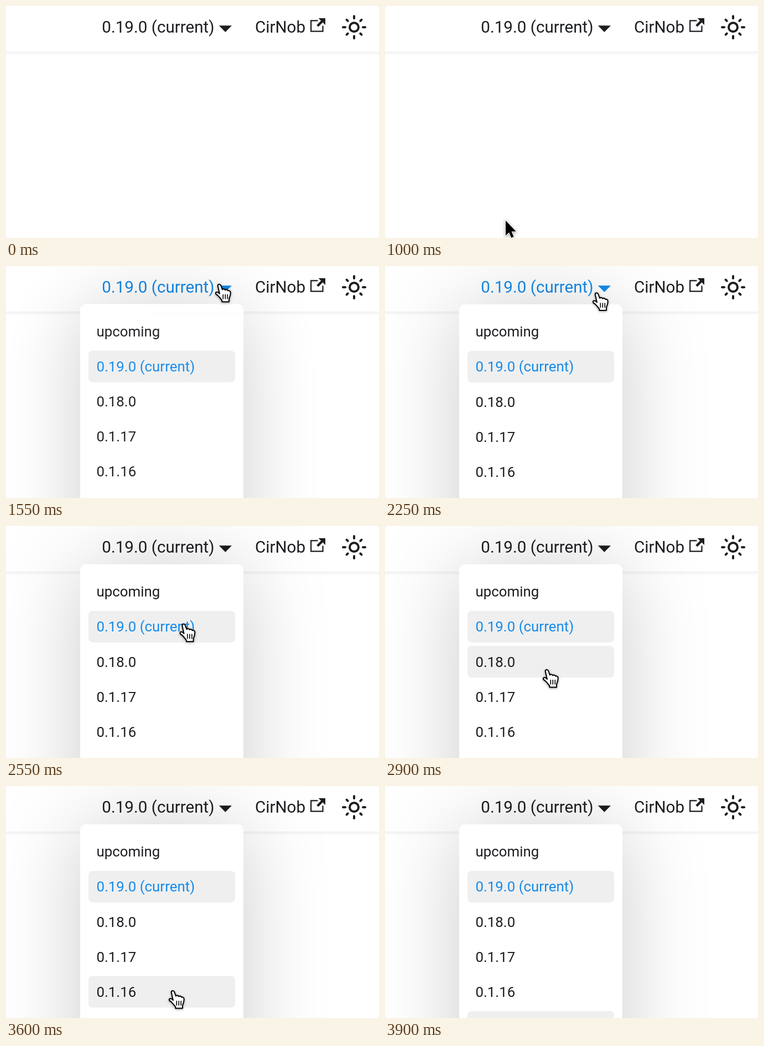
Animation of 674 by 418 pixels, one loop 5.9 s. Source, as an HTML page:

```html
<!DOCTYPE html>
<html lang="en">
<head>
<meta charset="utf-8">
<title>Version menu</title>
<style>
  html, body { margin: 0; width: 100%; height: 100%; overflow: hidden; background: #ececec; }
  svg { display: block; width: 674px; height: 418px; }
  text { font-family: Roboto, Arial, sans-serif; white-space: pre; }
  .nav { font-size: 29.6px; }
  .item { font-size: 25.9px; }
  .ink { fill: #1c1e21; }
  .bar { filter: drop-shadow(0 1.85px 3.7px rgba(0, 0, 0, .1)); }
  .panel { filter: drop-shadow(0 9px 74px rgba(0, 0, 0, .2)); }
  #cursor { filter: drop-shadow(0 1.5px 2px rgba(0, 0, 0, .4)); }
</style>
</head>
<body>
<svg viewBox="0 0 674 418">
  <defs><clipPath id="stage"><rect width="674" height="418" rx="4"/></clipPath></defs>
  <g clip-path="url(#stage)">
    <rect width="674" height="418" fill="#fff"/>
    <rect class="bar" x="-20" y="-20" width="714" height="102.2" fill="#fff"/>

    <g id="link">
      <text class="nav" x="173.3" y="48">0.19.0 (current)</text>
      <path d="M384.8 35.2H408L396.4 46.9Z"/>
    </g>
    <g class="ink">
      <text class="nav" x="450" y="48">CirNob</text>
      <path transform="translate(550 20.8) scale(1.125)" d="M21 13v10H0V4h12v2H2v15h17v-8zM24 1H13.012l4.035 4-6.977 7.07 2.828 2.828 6.977-7.07L24 12z"/>
    </g>
    <g id="sun" transform="translate(629 38.2) scale(2)" fill="none" stroke="#1c1e21" stroke-width="2" stroke-linecap="round">
      <circle r="4"/>
    </g>

    <g id="menu">
      <rect class="panel" x="134" y="69" width="295" height="560" rx="11" fill="#fff"/>
    </g>

    <g id="cursor">
      <path id="arrow" d="M0 0V27L6.2 21.4L10.2 31L14.6 29.2L10.6 19.7H18.8Z" stroke="#fff" stroke-width="2.2" paint-order="stroke"/>
      <g id="hand" fill="#fff" stroke="#000" stroke-width="2" stroke-linejoin="round" stroke-linecap="round">
        <path d="M-3.2 3.2C-3.8-.5 1-1.2 2.2 2L5 9.5C6 7.8 9.5 8 10 10.2C11.5 8.8 14.5 9.4 15 11.6C17 10.6 19.8 12 19.8 15C19.8 20 18.5 22.5 17.2 25.5L17 31.5H4.5L4 28.5C1 25-1 22-4 19.5C-8.5 17.5-7.5 13.5-4.5 14C-2.5 14.2-1 15.5 0 17Z"/>
        <path d="M6.3 18.5v7.5M10.3 18.5v7.5M14.3 18.5v7.5" stroke-width="1.6"/>
      </g>
    </g>
  </g>
</svg>
<script>
const LOOP = 5900, TICK = 50;
const ROW = { top: 89.9, pitch: 63.1, height: 57 };
const LABELS = ["upcoming", "0.19.0 (current)", "0.18.0", "0.1.17", "0.1.16", ""];
const CURRENT = 1;
const INK = [28, 30, 33], BLUE = [22, 139, 234];

// Pointer keys: time, x, y
const ARRIVE = [[1000, 218, 386.5], [1200, 283, 222], [1400, 362, 58], [1550, 386, 33], [1650, 393, 37]];
const BROWSE = [[2200, 393, 37], [2250, 383, 48.5], [2300, 373, 66], [2500, 329, 159], [2800, 294, 249],
  [2900, 293, 259], [3100, 295, 279], [3350, 297, 321.5], [3400, 299, 332], [3900, 306, 424]];

const $ = id => document.getElementById(id);
const clamp01 = v => Math.max(0, Math.min(1, v));
const easeOut = p => 1 - Math.pow(1 - clamp01(p), 2.5);

function add(parent, tag, attrs, text = "") {
  const el = document.createElementNS("http://www.w3.org/2000/svg", tag);
  for (const key in attrs) el.setAttribute(key, attrs[key]);
  el.textContent = text;
  parent.append(el);
  return el;
}

for (let i = 0; i < 8; i++) {
  add($("sun"), "path", { d: i % 2 ? "M8 0H9.5" : "M8 0H10", transform: `rotate(${i * 45})` });
}

const rows = LABELS.map((label, i) => {
  const y = ROW.top + i * ROW.pitch;
  const back = add($("menu"), "rect", { x: 149, y, width: 265, height: ROW.height, rx: 7.4, fill: "#efefef" });
  add($("menu"), "text", {
    class: "item", x: 163.4, y: y + 37.4,
    fill: `rgb(${i === CURRENT ? BLUE : INK})`
  }, label);
  return back;
});

// Smooth curve through timed keys
function along(keys, t) {
  const last = keys.length - 1;
  if (t <= keys[0][0]) return keys[0].slice(1);
  if (t >= keys[last][0]) return keys[last].slice(1);
  const i = keys.findIndex(k => k[0] > t) - 1;
  const slope = (k, c) => {
    const a = keys[Math.max(0, k - 1)], b = keys[Math.min(last, k + 1)];
    return (b[c] - a[c]) / (b[0] - a[0]);
  };
  const a = keys[i], b = keys[i + 1], span = b[0] - a[0];
  const s = (t - a[0]) / span, r = 1 - s;
  return [1, 2].map(c =>
    a[c] * (1 + 2 * s) * r * r + b[c] * s * s * (3 - 2 * s) +
    span * s * r * (slope(i, c) * r - slope(i + 1, c) * s));
}

function rowAt(y) {
  const offset = y - ROW.top, i = Math.floor(offset / ROW.pitch);
  return offset >= 0 && offset - i * ROW.pitch <= ROW.height ? i : -1;
}

function draw(t) {
  const [x, y] = along(t < 2200 ? ARRIVE : BROWSE, t);
  const open = easeOut((t - 1400) / 200);
  const glow = open - easeOut((t - 2300) / 200);
  const hover = t >= 2200 ? rowAt(y) : -1;
  const onLink = t >= 1400 && t < 2350 && y < 68;

  $("link").setAttribute("fill", `rgb(${INK.map((c, i) => Math.round(c + (BLUE[i] - c) * glow))})`);
  $("menu").setAttribute("opacity", open);
  $("menu").setAttribute("transform", `translate(0 ${(open - 1) * 18.5})`);
  rows.forEach((row, i) => row.setAttribute("opacity", i === CURRENT || i === hover ? 1 : 0));

  const pointing = onLink || hover >= 0;
  $("cursor").setAttribute("display", t >= 1000 && t < 3900 ? "inline" : "none");
  $("cursor").setAttribute("transform", `translate(${x} ${y})`);
  $("hand").setAttribute("display", pointing ? "inline" : "none");
  $("arrow").setAttribute("display", pointing ? "none" : "inline");
}

const start = performance.now();
function frame() {
  const t = (performance.now() - start) % LOOP;
  draw(Math.floor(t / TICK) * TICK);
  requestAnimationFrame(frame);
}
frame();
</script>
</body>
</html>
```
